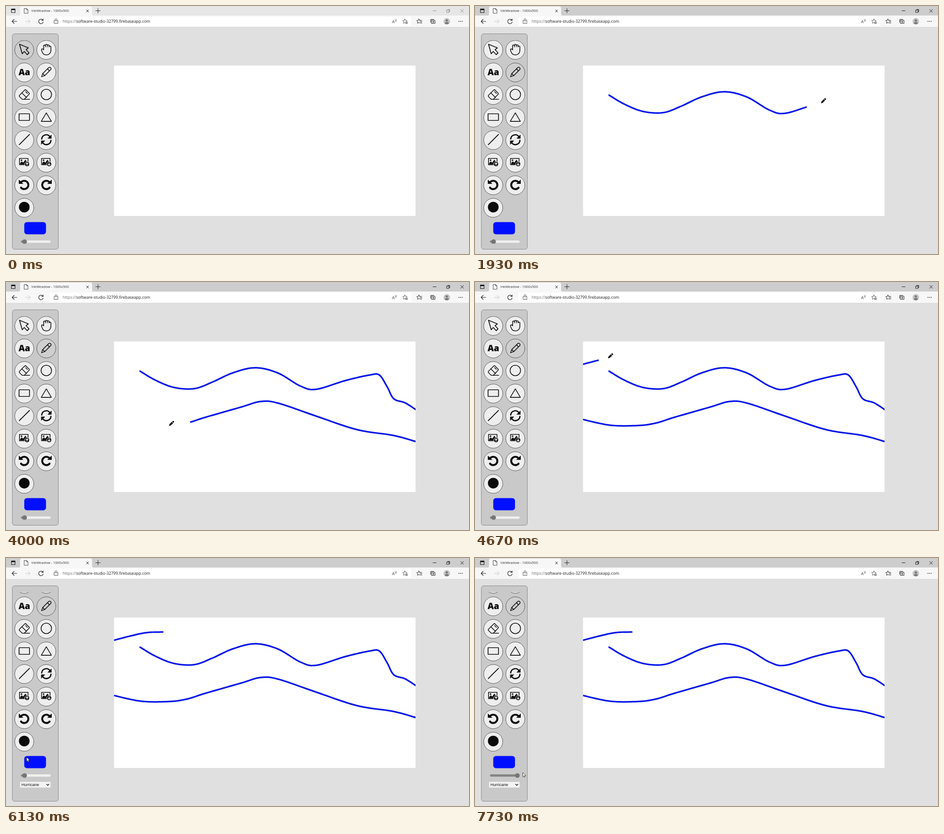
Write an HTML page with a canvas that moves like this. It is 1022 by 548 pixels and loops after 8 s.

```html
<!DOCTYPE html>
<html lang="en">
<head>
<meta charset="utf-8">
<title>Drawing app</title>
<style>
html, body { margin: 0; width: 100%; height: 100%; overflow: hidden; background: #e0e0e0; }
canvas { display: block; }
</style>
</head>
<body>
<canvas id="stage" width="1022" height="548"></canvas>
<script>
const ctx = document.getElementById('stage').getContext('2d');
const LOOP = 8000, STEP = 1000 / 15;
const INK = '#0a0a0a', BLUE = '#0416e6';
const PAGE = { x: 238.5, y: 131.5, w: 665.5, h: 332.5 };
const SANS = '"Open Sans", "Noto Sans", sans-serif';

const clamp = (v, a, b) => Math.min(b, Math.max(a, v));

// Catmull-Rom curve through the key points, as a fine polyline with running length
function curve(keys) {
  const key = i => keys[clamp(i, 0, keys.length - 1)];
  const out = [];
  let len = 0;
  for (let i = 0; i < keys.length - 1; i++) {
    for (let k = i ? 1 : 0; k <= 12; k++) {
      const u = k / 12;
      const [x, y] = [0, 1].map(c => {
        const [a, b, d, e] = [-1, 0, 1, 2].map(n => key(i + n)[c]);
        return b + u * (d - a + u * (2 * a - 5 * b + 4 * d - e + u * (3 * (b - d) + e - a))) / 2;
      });
      const last = out[out.length - 1];
      if (last) len += Math.hypot(x - last.x, y - last.y);
      out.push({ x, y, len });
    }
  }
  return out;
}

// One sweep of the pointer; a higher ease slows it more towards the end
function move(start, end, ease, ink, ...keys) {
  return { start, end, ease, ink, path: curve(keys) };
}

const moves = [
  move(67, 667, 1, false, [95, 215], [90, 150], [58, 491], [45, 466]),
  move(800, 1133, 1, false, [45, 466], [297, 198]),
  move(1133, 2440, 1.4, true, [296, 197], [330, 217], [371, 233], [416, 235.5], [456, 221], [500, 201],
    [550, 189.5], [600, 201], [650, 230], [685, 237], [750, 217.5], [803, 205.5], [824, 205.5],
    [841, 231], [856, 258], [881, 267], [906, 283]),
  move(2733, 3333, 2.5, false, [908, 283], [951, 290], [914, 353], [906, 353]),
  move(3333, 4210, 1.2, true, [906, 353], [855, 339], [774, 326], [678, 294], [600, 267.5], [562, 264],
    [520, 276], [440, 299], [400, 311.5], [362, 317], [299, 316.5], [237, 303.5]),
  move(4210, 4500, 1, false, [237, 303], [176, 225], [237, 182]),
  move(4500, 4860, 1.2, true, [237, 182], [303, 166], [346, 163.5]),
  move(5333, 5757, 1, false, [345, 165], [150, 331], [45, 440]),
  move(6200, 6933, 1.8, false, [45, 440], [19, 487], [50, 468], [44, 476]),
  move(7133, 7733, 1, false, [44, 476], [105, 474])
];

// The part of a move's path covered by time t
function covered({ start, end, ease, path }, t) {
  const u = clamp((t - start) / (end - start), 0, 1);
  const goal = path[path.length - 1].len * (1 - (1 - u) ** ease);
  const i = Math.max(1, path.findIndex(p => p.len >= goal - 1e-6));
  const a = path[i - 1], b = path[i], f = (goal - a.len) / (b.len - a.len);
  return [...path.slice(0, i), { x: a.x + (b.x - a.x) * f, y: a.y + (b.y - a.y) * f }];
}

function pointer(t) {
  if (t < 60 || (t > 5190 && t < 5390)) return null;
  return covered(moves.filter(m => t > m.start - 1).pop(), t).pop();
}

function fill(d, color) {
  ctx.fillStyle = color;
  ctx.fill(new Path2D(d));
}

function line(d, width = 1, color = INK) {
  ctx.strokeStyle = color;
  ctx.lineWidth = width;
  ctx.stroke(new Path2D(d));
}

function box(x, y, w, h, color, r = 0) {
  ctx.fillStyle = color;
  ctx.beginPath();
  ctx.roundRect(x, y, w, h, r);
  ctx.fill();
}

function disc(x, y, r, color, edge, width = 1) {
  ctx.beginPath();
  ctx.arc(x, y, r, 0, 7);
  if (color) { ctx.fillStyle = color; ctx.fill(); }
  if (edge) { ctx.strokeStyle = edge; ctx.lineWidth = width; ctx.stroke(); }
}

function text(s, x, y, font, color = '#1b1b1b') {
  ctx.font = font;
  ctx.fillStyle = color;
  ctx.fillText(s, x, y);
  return ctx.measureText(s).width;
}

function at(x, y, draw) {
  ctx.save();
  ctx.translate(x, y);
  draw();
  ctx.restore();
}

function picture(up) {
  line('M-10.5-8.5H8.3V5.5H-10.5Z', 1.6);
  disc(-6, -4.5, 1.7, INK);
  fill('M-9 4.5V2L-5.5-2-2.5 1 2.5-5.5 7 0V4.5Z', INK);
  disc(6.2, 4, 5.3, INK, '#eee', 1);
  at(6.2, 4, () => {
    if (up) ctx.scale(1, -1);
    line('M0-3V2.6M-2.3.4L0 2.7 2.3.4', 1.4, '#fff');
  });
}

function undo() {
  line('M-6.5-6.3A9.2 9.2 0 1 1-7.2 6.2', 4.2);
  fill('M-12-11.5V-2H-2Z', INK);
}

const icons = [
  () => line('M-10.5-11.5L-4.5 9.5 0 4.5 6.5 11.5 10.5 7.5 4 .5 9-3.5Z', 1.8),
  () => {
    line('M-6 1V-7.5a2.1 2.1 0 0 1 4.2 0V-9.3a2 2 0 0 1 4 0V-8.3a2 2 0 0 1 4 0V-6a2 2 0 0 1 3.9 0V1.5C10.1 8 6 12 0 12S-7.5 10-10 3.5L-10.6 1C-11-1.5-7.5-2.5-6 1', 1.6);
    line('M-1.8-7.5v2M2.2-8.5v3M6.2-7.5v2', 1.3);
  },
  () => text('Aa', -12.5, 7.5, '800 19px ' + SANS, INK),
  () => line('M-10.5 10.5L-8 3.5 5.5-10Q7.5-11.5 9.5-9.5T10-5.5L-3.5 8ZM2.5-7L7-2.5M-8 3.5L-3.5 8', 1.5),
  () => line('M-10 1L1-10Q2.5-11.5 4-10L10.5-3.5Q12-2 10.5-.5L0 10.5H-4.5L-10 5Q-12 3-10 1ZM-5.5-4L5 6.5M0 10.5H12M3-6.5L7-2.5', 1.6),
  () => disc(0, -.2, 11.5, null, INK, 1.7),
  () => line('M-11.5-7.3H11.5V7.2H-11.5Z', 1.7),
  () => line('M0-9.5L11.2 9.3H-11.2Z', 1.6),
  () => line('M-11 11L11.5-11.5', 2),
  () => {
    line('M-10.2-1.5A10 10 0 0 1 8-6.5M10.2 1.5A10 10 0 0 1-8 6.5', 2.7);
    fill('M11.5-11.5V-2.5H2.5ZM-11.5 11V2H-2.5Z', INK);
  },
  () => picture(true),
  () => picture(false),
  undo,
  () => { ctx.scale(-1, 1); undo(); },
  () => disc(0, -.5, 11.8, INK)
];

function browser(focused) {
  const ctl = focused ? '#1c1c1c' : '#8a8a8a';
  box(0, 0, 1022, 22, focused ? '#cdcdcd' : '#e6e6e6');
  box(0, 21, 1022, 26, '#f7f7f7');
  box(0, 46.5, 1022, 1, '#d4d4d4');
  fill('M27 21.5Q31 21.5 31 17.5V5Q31 1 35 1H186Q190 1 190 5V17.5Q190 21.5 194 21.5Z', '#f7f7f7');
  line('M12 6.5H20V14.5H12Z', 1.1);
  box(12, 6, 8, 3, INK);
  line('M40.5 5.5H45.5L48.5 8.5V16H40.5ZM45.5 5.5V8.5H48.5', 1, '#444');
  text('InkMeadow - 1000x500', 56, 13.2, '7.7px ' + SANS, '#333');
  line('M177.5 8.5L182.5 13.5M182.5 8.5L177.5 13.5', 1, '#222');
  line('M198 10.5H208M203 5.5V15.5', 1, '#222');
  line('M942.5 10.5H949.5M973 9H978V14H973ZM975 9V7.5H979.5V12.5H978M1003.5 7.5L1010 14M1010 7.5L1003.5 14', 1, ctl);

  line('M24 34H13.5M18 29.5L13.5 34 18 38.5', 1.2, '#222');
  line('M43 34H53.5M49 29.5L53.5 34 49 38.5', 1, '#c4c4c4');
  line('M81.5 31.5A5 5 0 1 0 82 35.5M82 28.5V32H78.5', 1.2, '#222');
  box(96, 23.5, 798, 21, '#fff', 3);
  line('M106.5 32H114.5V38.5H106.5ZM108.5 32V30A2 2 0 0 1 112.5 30V32', 1, '#555');
  disc(110.5, 35.2, .8, '#555');
  const font = '8.8px ' + SANS;
  const w = text('https://', 125, 37.2, font, '#6c6c6c');
  text('software-studio-32799.firebaseapp.com', 125 + w, 37.2, font);
  text('A', 852, 38, '9.5px ' + SANS, '#444');
  line('M859 30Q860.5 31.5 859 33.5M861 29Q863 31.5 861 34.5', .8, '#444');
  const star = 'M0-5L1.5-1.6 5-1.2 2.4 1.2 3.1 4.7 0 3-3.1 4.7-2.4 1.2-5-1.2-1.5-1.6Z';
  at(880.5, 33.5, () => {
    line(star, .9, '#444');
    disc(3.5, 3.5, 3, '#444', '#fff', .7);
    line('M1.8 3.5H5.2M3.5 1.8V5.2', .8, '#fff');
  });
  at(911.5, 33.5, () => {
    line(star, 1, '#222');
    box(2, -1.5, 6, 7, '#f7f7f7');
    line('M2-1.5H6.5M3 1.2H6.5M3 4H6.5', 1, '#222');
  });
  line('M937.5 36V29.5H944.5M939.5 31.5H947V38.5H939.5ZM943.2 33V37M941.2 35H945.2', 1, '#222');
  disc(973, 34, 7.2, '#c2c2c2');
  disc(973, 32, 2.5, '#777');
  fill('M968.5 38.5Q968.5 35.5 973 35.5T977.5 38.5Q973 42 968.5 38.5Z', '#777');
  for (let i = -1; i < 2; i++) disc(1003.4 + 3.6 * i, 34, .9, '#222');
}

function panel(active, scroll, thumb) {
  box(14, 61.5, 101.5, 476, '#c9c9c9', 5);
  ctx.strokeStyle = '#858585';
  ctx.lineWidth = 1;
  ctx.stroke();
  ctx.save();
  ctx.beginPath();
  ctx.rect(15, 75.5, 100, 450);
  ctx.clip();
  ctx.translate(0, -scroll);
  icons.forEach((draw, i) => {
    const x = i % 2 ? 89 : 40.3, y = 97 + 49.85 * (i >> 1);
    disc(x, y, 21, i === active ? '#cfcfcf' : '#eeeeee', '#555', 1);
    at(x, y - 1, draw);
  });
  box(40.3, 477.5, 48, 27, '#0010ff', 6);
  box(33, 518, 65.5, 5.2, '#efefef', 2.6);
  box(33, 518, thumb - 33, 5.2, '#858585', 2.6);
  disc(thumb, 520.6, 5.2, '#757575');
  box(31, 534.8, 67.5, 12.4, '#f4f4f4', 1);
  text('Hurricane', 34, 544, '9px "Liberation Sans", Arial, sans-serif', '#111');
  line('M89.5 539.8L92.2 542.5 94.9 539.8', 1.3, '#111');
  ctx.restore();
}

function drawing(t) {
  box(PAGE.x, PAGE.y, PAGE.w, PAGE.h, '#fff');
  ctx.save();
  ctx.beginPath();
  ctx.rect(PAGE.x, PAGE.y, PAGE.w, PAGE.h);
  ctx.clip();
  ctx.strokeStyle = BLUE;
  ctx.lineWidth = 3.5;
  for (const m of moves) {
    if (!m.ink || t < m.start - 1) continue;
    // ink trails the pen by one step until the pen lifts
    ctx.beginPath();
    for (const p of covered(m, t > m.end ? t : t - STEP)) ctx.lineTo(p.x, p.y);
    ctx.stroke();
  }
  ctx.restore();
}

function drawPointer({ x, y }) {
  const inside = x > PAGE.x && x < PAGE.x + PAGE.w && y > PAGE.y && y < PAGE.y + PAGE.h;
  at(x, y, () => {
    if (inside) {
      fill('M0 1L1-3 6.2-8.2 9-5.2 3.8 0Z', '#0c0c0c');
      fill('M6.9-8.8L8.4-10.2Q9.2-10.8 10-10L11-9Q11.8-8.2 11-7.4L9.6-5.9Z', '#0c0c0c');
    } else {
      const d = 'M.5.5V9.3L2.6 7.4 4.1 10.8 5.6 10.1 4.2 6.9H7Z';
      fill(d, '#fff');
      line(d, .9, '#333');
    }
  });
}

function render(t) {
  ctx.lineJoin = ctx.lineCap = 'round';
  box(0, 0, 1022, 548, '#e0e0e0');
  browser(t > 60);
  const pos = pointer(t);
  const s = clamp((t - 5800) / 330, 0, 1);
  const thumb = t > 7140 ? clamp(pos.x - 3, 41, 93.5) : 41;
  panel(t < 195 ? 0 : 3, 40 * s * s * (3 - 2 * s), thumb);
  drawing(t);
  if (pos) drawPointer(pos);
}

function tick() {
  const n = Math.floor((performance.now() % LOOP) / STEP + .06);
  render(n * STEP % LOOP);
  requestAnimationFrame(tick);
}
tick();
</script>
</body>
</html>
```
